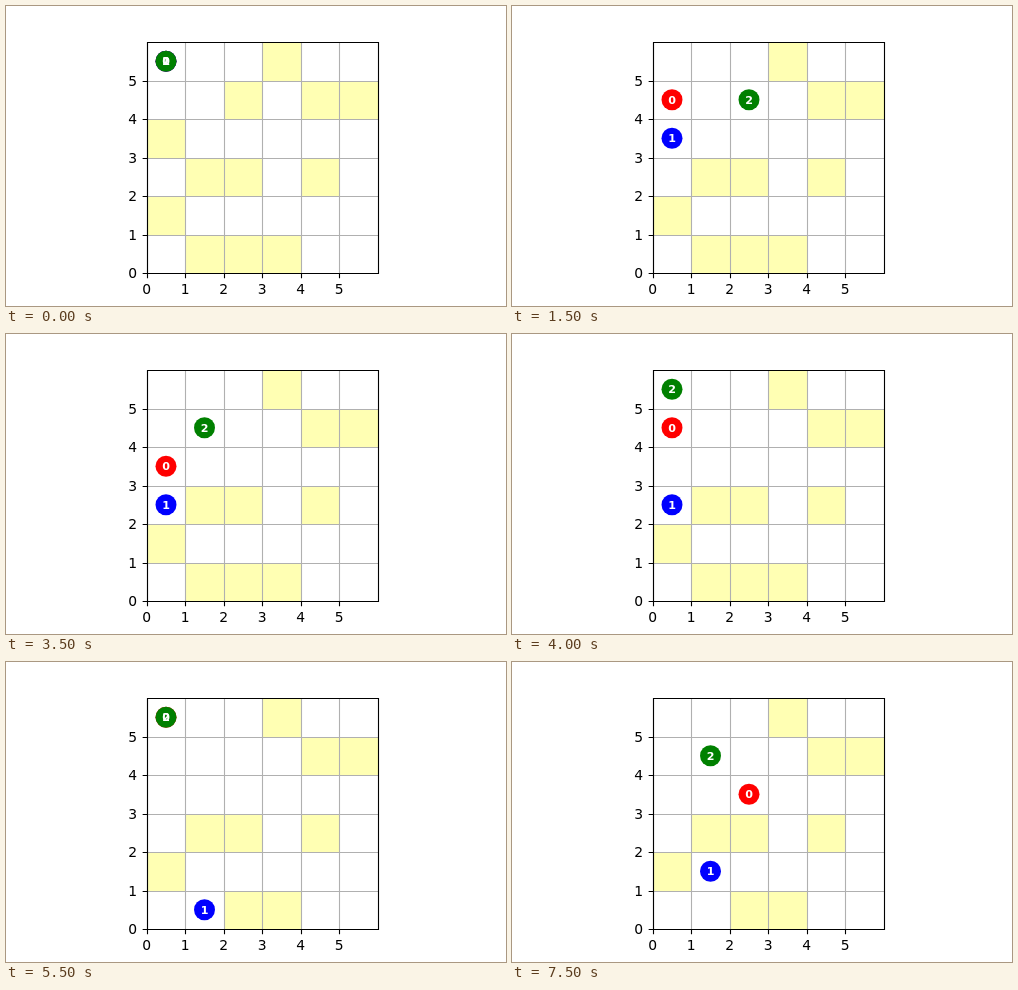
These frames come from a looping animation (500 px wide and 300 px high, 8 s). An HTML page:

```html
<!DOCTYPE html>
<html lang="en">
<head>
<meta charset="utf-8">
<title>Grid agents</title>
<style>
html, body { margin: 0; width: 100%; height: 100%; overflow: hidden; background: #fff; }
svg { display: block; width: 500px; height: 300px; }
text { font-family: "DejaVu Sans", sans-serif; font-size: 13.89px; }
.id { font-weight: bold; font-size: 11.11px; fill: #fff; text-anchor: middle; }
</style>
</head>
<body>
<svg id="stage" viewBox="0 0 500 300"></svg>
<script>
const LEFT = 140.75, TOP = 36, CELL = 38.5, SIZE = 6;
const STEP = 500, STEPS = 16, LINE = 1.11;
const stage = document.getElementById("stage");

const x = col => LEFT + col * CELL;
const y = row => TOP + row * CELL;
const snap = v => Math.floor(v + 0.5);

function add(tag, attrs, label) {
  const node = document.createElementNS("http://www.w3.org/2000/svg", tag);
  set(node, attrs);
  if (label !== undefined) node.textContent = label;
  return stage.appendChild(node);
}

function set(node, attrs) {
  for (const key in attrs) node.setAttribute(key, attrs[key]);
}

const line = (d, color) =>
  add("path", { d, stroke: color, "stroke-width": LINE, fill: "none" });

// Column, row and, for cells that get cleared, the step that clears them.
const cells = [
  [3, 0], [2, 1, 3], [4, 1], [5, 1], [0, 2, 3], [1, 3], [2, 3], [4, 3],
  [0, 4], [1, 5, 11], [2, 5], [3, 5]
].map(([col, row, cleared = Infinity]) => {
  const left = snap(x(col)), top = snap(y(row));
  const node = add("rect", {
    x: left, y: top, fill: "#ffffb3",
    width: snap(x(col + 1)) - left, height: snap(y(row + 1)) - top
  });
  return { node, cleared };
});

const right = snap(x(SIZE)) + 0.5, bottom = snap(y(SIZE)) + 0.5;
const left = snap(LEFT) + 0.5, top0 = TOP + 0.5;

for (let i = 0; i < SIZE; i++) {
  const gx = snap(x(i)) + 0.5, gy = snap(y(SIZE - i)) + 0.5;
  line(`M${gx} ${top0}V${bottom}`, "#b0b0b0");
  line(`M${left} ${gy}H${right}`, "#b0b0b0");
  line(`M${gx} ${bottom}v4.86M${left} ${gy}h-4.86`, "#000");
  add("text", { x: x(i), y: 288, "text-anchor": "middle" }, i);
  add("text", { x: 131, y: snap(y(SIZE - i)) + 5, "text-anchor": "end" }, i);
}
line(`M${left} ${top0}H${right}V${bottom}H${left}Z`, "#000");

// One "column row" pair per step.
const agents = [
  ["red", "00 00 00 01 02 02 02 02 01 01 00 00 10 10 11 22"],
  ["blue", "00 01 12 02 12 03 12 03 03 14 24 15 15 05 05 14"],
  ["green", "00 11 11 21 11 21 10 11 00 00 00 00 00 01 00 11"]
].map(([color, route]) => ({
  route: route.split(" "),
  disc: add("circle", { r: 10.5, fill: color })
}));
agents.forEach((agent, i) => { agent.label = add("text", { class: "id" }, i); });

function draw(time) {
  const step = Math.floor(time / STEP) % STEPS;
  for (const { node, cleared } of cells)
    set(node, { visibility: step < cleared ? "visible" : "hidden" });
  for (const { route, disc, label } of agents) {
    const [col, row] = route[step];
    const cx = x(+col + 0.5), cy = y(+row + 0.5);
    set(disc, { cx, cy });
    set(label, { x: cx, y: Math.round(cy + 4) });
  }
}

let start;
function tick(now) {
  start ??= now;
  draw(now - start);
  requestAnimationFrame(tick);
}
draw(0);
requestAnimationFrame(tick);
</script>
</body>
</html>
```
